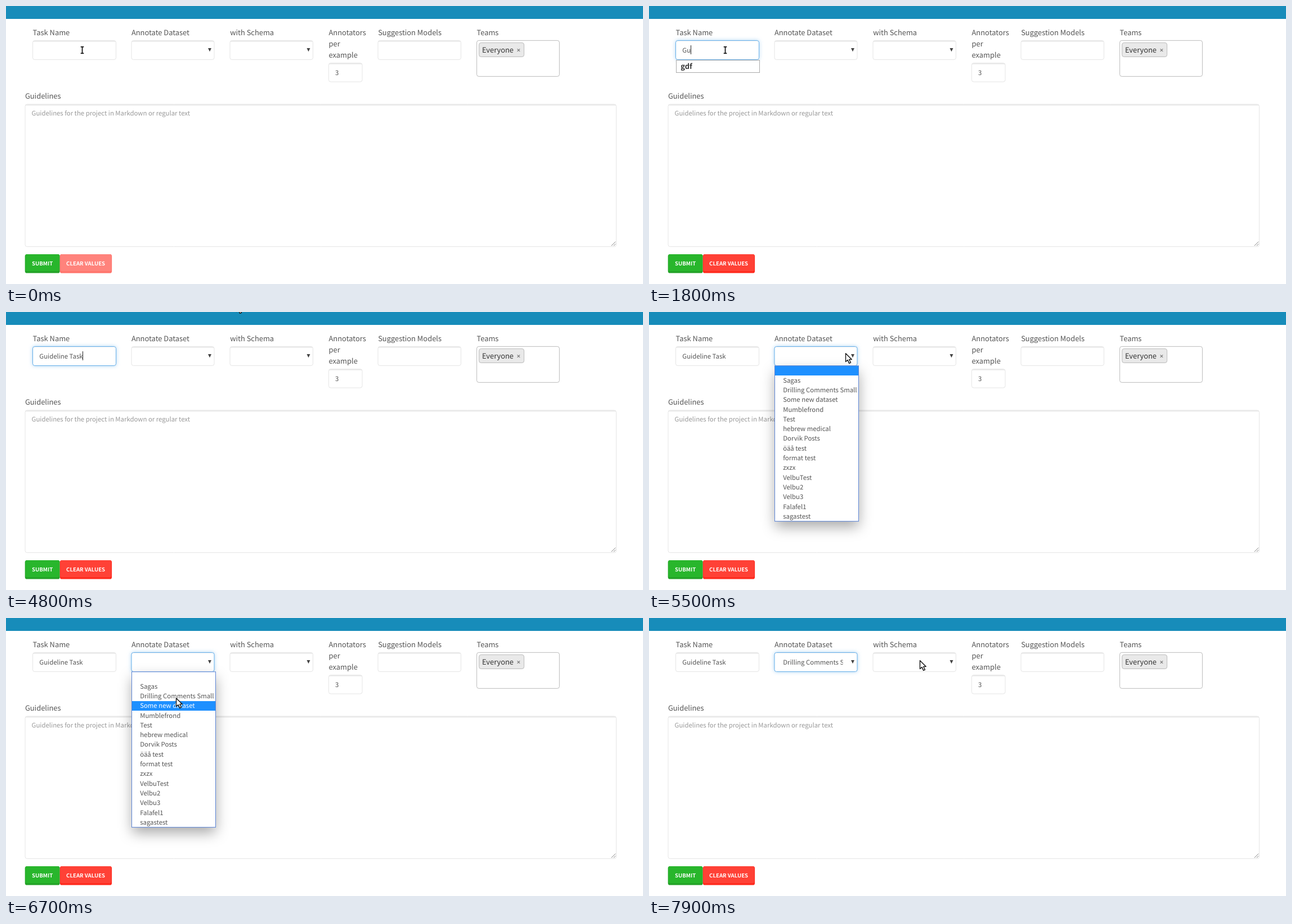
An HTML page with a canvas for the animation above (8000 ms loop, 1132 px wide and 495 px high).

```html
<!DOCTYPE html>
<html lang="en">
<head>
<meta charset="utf-8">
<title>Task form</title>
<style>
  html, body { margin: 0; width: 100%; height: 100%; overflow: hidden; background: #fff; }
  canvas { display: block; }
</style>
</head>
<body>
<canvas id="stage" width="1132" height="495"></canvas>
<script>
const ctx = document.getElementById('stage').getContext('2d');
const LOOP = 8000, STEP = 100;
const FAMILY = '"Noto Sans CJK JP", "Noto Sans CJK SC", "Noto Sans CJK", "Open Sans", sans-serif';
const LABEL = `12.9px ${FAMILY}`;
const SMALL = `11.36px ${FAMILY}`;
const BUTTON = `bold 9.65px ${FAMILY}`;
const HINT = `bold 12.9px ${FAMILY}`;

const TASK = [47.5, 61.5, 148, 34];
const DATASET = [223, 61.5, 147, 34];
const SCHEMA = [398, 61.5, 147.5, 34];
const MENU = { x: 223.5, y: 95.8, w: 149, h: 276.8, row: 17.3 };
const DATASETS = ['', 'Sagas', 'Drilling Comments Small', 'Some new dataset', 'Mumblefrond',
  'Test', 'hebrew medical', 'Dorvik Posts', 'öäå test', 'format test', 'zxzx',
  'VelbuTest', 'Velbu2', 'Velbu3', 'Falafel1', 'sagastest'];

const NAME = 'Guideline Task';
const KEY_TIMES = [1600, 1800, 2000, 2100, 2300, 2400, 2600, 2700, 2800, 2900, 3200, 3300, 3400, 3600];

// Pointer path: time, x, y
const PATH = [
  [0, 135.5, 78.5], [4500, 135.5, 78.5], [4600, 170, 68], [4700, 300, 15], [4800, 409, -16],
  [4900, 405, 25], [5000, 385, 110], [5100, 370, 175], [5200, 360, 150], [5300, 353, 100],
  [5400, 349, 73], [6000, 349, 73], [6100, 345, 82], [6300, 330, 118], [6500, 311, 158],
  [6600, 305, 161], [6700, 302, 142], [6800, 300, 141], [7400, 300, 141], [7500, 318, 134],
  [7700, 420, 97], [7900, 481, 75], [8000, 481, 75]
];

function pointerAt(t) {
  const i = PATH.findIndex((p, n) => n > 0 && t <= p[0]);
  const [t0, x0, y0] = PATH[i - 1], [t1, x1, y1] = PATH[i];
  const k = (t - t0) / (t1 - t0);
  return { x: x0 + (x1 - x0) * k, y: y0 + (y1 - y0) * k };
}

function text(str, x, y, font, color) {
  ctx.font = font;
  ctx.fillStyle = color;
  ctx.fillText(str, x, y);
}

function roundPath(x, y, w, h, r) {
  ctx.beginPath();
  ctx.roundRect(x, y, w, h, r);
}

function polygon(points) {
  ctx.beginPath();
  points.forEach(([x, y]) => ctx.lineTo(x, y));
  ctx.closePath();
}

function line(x0, y0, x1, y1) {
  ctx.beginPath();
  ctx.moveTo(x0, y0);
  ctx.lineTo(x1, y1);
  ctx.stroke();
}

function field([x, y, w, h], focus = 0) {
  const outline = () => roundPath(x, y, w, h, 3.6);
  if (focus) {
    ctx.save();
    ctx.shadowColor = `rgba(102,175,233,${0.6 * focus})`;
    ctx.shadowBlur = 7.2;
    ctx.fillStyle = '#fff';
    outline();
    ctx.fill();
    ctx.restore();
  }
  ctx.save();
  outline();
  ctx.fillStyle = '#fff';
  ctx.fill();
  ctx.clip();
  ctx.fillStyle = `rgba(0,0,0,${0.075 - 0.035 * focus})`;
  ctx.fillRect(x, y, w, 2.4 - focus * 0.8);
  ctx.restore();
  const mix = (a, b) => Math.round(a + (b - a) * focus);
  ctx.strokeStyle = `rgb(${mix(229, 102)},${mix(229, 175)},${mix(229, 233)})`;
  ctx.lineWidth = 1;
  outline();
  ctx.stroke();
}

function select(box, focus) {
  field(box, focus);
  const x = box[0] + box[2] - 8;
  polygon([[x - 3, 75], [x + 3, 75], [x, 81.3]]);
  ctx.fillStyle = '#444';
  ctx.fill();
}

function button(label, x, w, face, edge, textX, enabled = true) {
  roundPath(x, 442, w, 33.5, 3.6);
  ctx.fillStyle = edge;
  ctx.fill();
  roundPath(x + 0.9, 442, w - 1.8, 30.2, 3);
  ctx.fillStyle = face;
  ctx.fill();
  text(label, textX, 462, BUTTON, '#fff');
  if (!enabled) {
    roundPath(x, 442, w, 33.5, 3.6);
    ctx.fillStyle = 'rgba(255,255,255,0.35)';
    ctx.fill();
  }
}

function teams() {
  ctx.lineWidth = 0.9;
  ctx.strokeStyle = '#b5b5b5';
  ctx.fillStyle = '#fff';
  roundPath(836.6, 61.4, 146.8, 64, 3.6);
  ctx.fill();
  ctx.stroke();
  ctx.fillStyle = '#e9e9e9';
  roundPath(840.6, 65.4, 80, 25, 3.6);
  ctx.fill();
  ctx.stroke();
  text('Everyone', 845.9, 83, LABEL, '#333');
  ctx.strokeStyle = '#777';
  ctx.lineWidth = 1.2;
  line(908.6, 76.3, 913.2, 80.9);
  line(913.2, 76.3, 908.6, 80.9);
}

function guidelines() {
  text('Guidelines', 33.9, 165, LABEL, '#555');
  field([34, 175, 1050.5, 253.5]);
  text('Guidelines for the project in Markdown or regular text', 45.6, 194.6, SMALL, '#999');
  ctx.strokeStyle = '#777';
  ctx.lineWidth = 0.9;
  line(1075.8, 427, 1083.2, 419.6);
  line(1079.8, 427, 1083.2, 423.6);
}

function form(t, focusTask, focusData) {
  ctx.fillStyle = '#fff';
  ctx.fillRect(0, 0, 1132, 495);
  ctx.fillStyle = '#178cba';
  ctx.fillRect(0, 0, 1132, 23);

  // Labels sit on a grid of half columns.
  const column = n => 47.6 + 87.65 * n;
  [['Task Name', 0], ['Annotate Dataset', 2], ['with Schema', 4],
   ['Suggestion Models', 7], ['Teams', 9]]
    .forEach(([s, n]) => text(s, column(n), 52, LABEL, '#555'));
  ['Annotators', 'per', 'example']
    .forEach((s, i) => text(s, column(6), 52 + 20 * i, LABEL, '#555'));

  field(TASK, focusTask);
  select(DATASET, focusData);
  select(SCHEMA, 0);
  field([573.5, 101.5, 59.5, 33.5]);
  text('3', 585, 123, SMALL, '#555');
  field([661, 61.5, 147.5, 34]);
  teams();
  guidelines();
  button('SUBMIT', 33.7, 62, '#28b62c', '#23a127', 46);
  button('CLEAR VALUES', 95.8, 92.3, '#ff4136', '#ff291c', 107.1, t >= KEY_TIMES[0]);
}

function taskName(t) {
  const count = KEY_TIMES.filter(k => k <= t).length;
  const typed = NAME.slice(0, count);
  text(typed, 59.3, 82.5, SMALL, '#555');

  const blinkOn = count
    ? (t - KEY_TIMES[count - 1]) % 1000 < 500
    : t >= 400 && t < 1000;
  if (blinkOn && t < 5400) {
    ctx.fillStyle = '#222';
    ctx.fillRect(Math.floor(59.3 + ctx.measureText(typed).width), 70, 1, 16);
  }
  if (t >= 1700 && t < 1900) {
    ctx.fillStyle = '#fff';
    ctx.strokeStyle = '#aaa';
    ctx.lineWidth = 1;
    ctx.fillRect(48.5, 96.5, 148, 22);
    ctx.strokeRect(48.5, 96.5, 148, 22);
    text('gdf', 56.3, 112, HINT, '#333');
  }
}

function datasetValue() {
  ctx.save();
  ctx.beginPath();
  ctx.rect(230, 65, 114.5, 28);
  ctx.clip();
  text(DATASETS[2], 238.2, 82.5, SMALL, '#555');
  ctx.restore();
}

function menu(t) {
  const { x, y, w, h, row } = MENU;
  ctx.save();
  ctx.shadowColor = 'rgba(0,0,0,0.35)';
  ctx.shadowBlur = 23;
  ctx.shadowOffsetY = 10;
  ctx.fillStyle = '#fff';
  ctx.fillRect(x, y, w, h);
  ctx.restore();

  // The highlight trails the pointer by one step.
  const hover = Math.max(0, Math.floor((pointerAt(t - STEP).y - y) / row));
  const top = Math.round(y + hover * row);
  ctx.fillStyle = '#1e90ff';
  ctx.fillRect(x, top, w, Math.round(y + (hover + 1) * row) - top);
  DATASETS.forEach((s, i) =>
    text(s, 238.2, 108.3 + i * row, SMALL, i === hover ? '#fff' : '#555'));
  ctx.strokeStyle = '#5b84d6';
  ctx.lineWidth = 1;
  ctx.strokeRect(x, y, w, h);
}

function beam(x, y) {
  for (const [color, width] of [['#fff', 3.6], ['#111', 1.7]]) {
    ctx.strokeStyle = color;
    ctx.lineWidth = width;
    line(x, y - 5.8, x, y + 5.8);
    line(x - 2.8, y - 5.8, x + 2.8, y - 5.8);
    line(x - 2.8, y + 5.8, x + 2.8, y + 5.8);
  }
}

function arrow(x, y) {
  ctx.save();
  ctx.translate(x + 0.5, y + 0.8);
  polygon([[0, 0], [0, 14.8], [3.5, 11.6], [6.2, 17.6], [9, 16.4], [6.3, 10.6], [10.8, 10.6]]);
  ctx.lineJoin = 'round';
  ctx.lineWidth = 1.4;
  ctx.strokeStyle = '#111';
  ctx.fillStyle = '#fff';
  ctx.fill();
  ctx.stroke();
  ctx.restore();
}

function pointer(t) {
  const { x, y } = pointerAt(t);
  const overTask = x < 196 && y > 61 && y < 96;
  (overTask ? beam : arrow)(x, y);
}

function draw(t) {
  const focusTask = t < 400 || t >= 5500 ? 0 : t < 500 || t >= 5400 ? 0.6 : 1;
  const focusData = t < 5400 ? 0 : t < 5500 ? 0.6 : 1;
  ctx.textRendering = 'geometricPrecision';
  form(t, focusTask, focusData);
  taskName(t);
  if (t >= 7200) datasetValue();
  if (t >= 5500 && t < 7200) menu(t);
  pointer(t);
}

const start = performance.now();
function frame() {
  const t = (performance.now() - start) % LOOP;
  draw(Math.floor(t / STEP) * STEP);
  requestAnimationFrame(frame);
}
frame();
</script>
</body>
</html>
```
